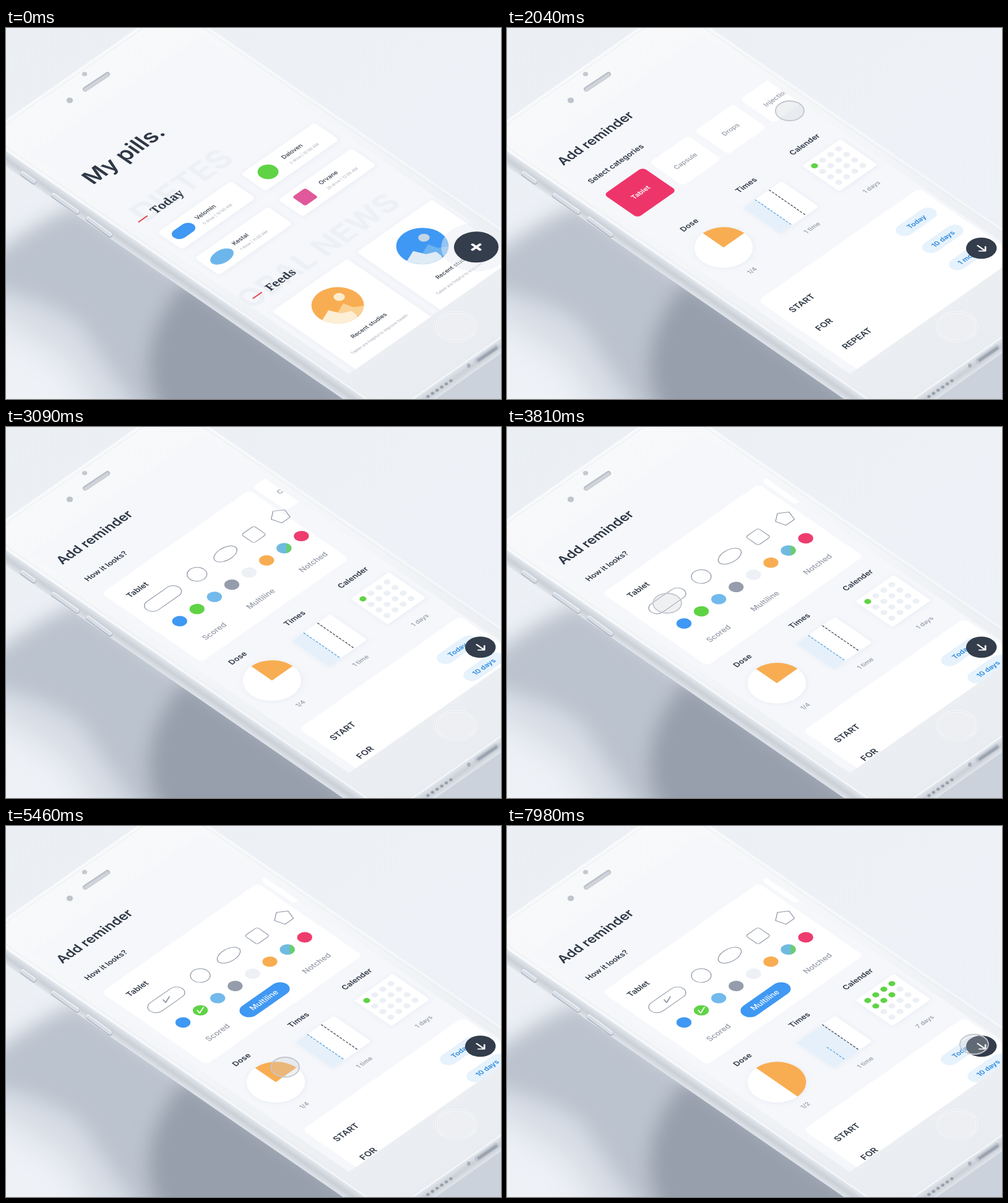
These frames come from a looping animation (800x600 px, 8000 ms). An HTML page:

```html
<!DOCTYPE html>
<html lang="en">
<head>
<meta charset="utf-8">
<title>Pill reminder</title>
<style>
html, body { margin: 0; width: 100%; height: 100%; overflow: hidden; background: #edf1f6; }
svg { display: block; width: 100vw; height: 100vh; }
text { font-family: Inter, sans-serif; font-weight: 600; fill: #2f3846; }
.mid { text-anchor: middle; }
.name { font-weight: 500; }
.soft { font-weight: 500; fill: #9298a5; }
.tiny { font-weight: 400; fill: #a4a9b4; }
.serif { font-family: "Noto Serif", serif; font-weight: 700; }
.ghost { font-weight: 700; fill: #edf0f5; }
.blue { fill: #2b88de; }
.line { fill: none; stroke: #8b93a3; stroke-width: .9; }
.round { fill: none; stroke-linecap: round; stroke-linejoin: round; }
.cards { filter: drop-shadow(0 1px 3px #d5dce780); }
</style>
</head>
<body>
<svg id="stage" viewBox="0 0 800 600" preserveAspectRatio="none"></svg>
<script>
const LOOP = 8000;
const PLANE = 'matrix(1 -.7 1 .69 40 205)';
const DARK = '#333d4b', GREEN = '#5fd345', BLUE = '#3f98f3', ORANGE = '#f8ad52', PINK = '#ee356a';

// ---- shape helpers (plane coordinates: u along the text, v down the screen) ----
const rect = (u, v, w, h, r, fill, more = '') =>
  `<rect x="${u}" y="${v}" width="${w}" height="${h}" rx="${r}" fill="${fill}" ${more}/>`;
const dot = (u, v, r, fill, more = '') => `<circle cx="${u}" cy="${v}" r="${r}" fill="${fill}" ${more}/>`;
const pill = (u, v, w, h, fill, more = '') => rect(u - w / 2, v - h / 2, w, h, h / 2, fill, more);
const text = (u, v, size, str, cls = '', more = '') =>
  `<text x="${u}" y="${v}" font-size="${size}" class="${cls}" ${more}>${str}</text>`;
const group = (id, body, more = '') => `<g id="${id}" ${more}>${body}</g>`;
const bar = (x1, y1, x2, y2, w, color) =>
  `<path class="round" d="M${x1} ${y1}L${x2} ${y2}" stroke="${color}" stroke-width="${w}"/>`;
// stage offset -> plane offset
const toPlane = ([x, y]) => {
  const v = (y + .7 * x) / 1.39;
  return [x - v, v];
};
const poly = (u, v, pts, fill, more = '') =>
  `<polyline points="${pts.map(p => { const [a, b] = toPlane(p); return [u + a, v + b]; }).join(' ')}" fill="${fill}" ${more}/>`;

// ---- phone ----
function phone() {
  let side = '';
  for (let d = 26; d > 0; d -= 2) {
    const shade = 207 + Math.round(28 * Math.abs(d - 15) / 15);
    side += `<g transform="translate(0 ${d})">${rect(-15, -60, 305, 655, 42,
      `rgb(${shade - 5},${shade},${shade + 7})`, `transform="${PLANE}"`)}</g>`;
  }
  const key = (x1, y1, x2, y2) =>
    bar(x1, y1, x2, y2, 8, '#a8b1bd') + bar(x1, y1 - 1, x2, y2 - 1, 6.5, '#eef1f5') + bar(x1, y1, x2, y2, 4.5, '#d7dde5');
  let holes = '';
  for (let i = 0; i < 6; i++) holes += `<ellipse cx="${682 + i * 7.4}" cy="${596 - i * 5.1}" rx="2.7" ry="2.4" fill="#979faa"/>`;
  return '<path d="M560 600L800 510V600Z" fill="#cbd2db"/>' + side
    + `<g transform="${PLANE}">`
    + rect(-15, -60, 305, 655, 42, 'url(#face)', 'stroke="#fafbfc" stroke-width="1.4"')
    + rect(-11, -56, 297, 647, 38, 'none', 'stroke="#e8ecf0" stroke-width=".8"')
    + '</g>'
    + key(27, 236, 45, 249) + key(77, 271, 115, 298) + key(133, 309, 168, 335)
    + bar(128, 99, 164, 75, 8, '#b9bec6') + bar(128, 100, 164, 76, 5, '#d0d4da')
    + '<ellipse cx="127" cy="74.500" rx="4.200" ry="3.600" fill="#c4c9d0"/>'
    + '<ellipse cx="103" cy="117" rx="5.200" ry="4.500" fill="#bfc4cc"/>'
    + '<ellipse cx="727.500" cy="483" rx="32" ry="23.500" fill="#edeff3" stroke="#fff" stroke-width="3"/>'
    + '<ellipse cx="727.500" cy="483" rx="32" ry="23.500" fill="none" stroke="#d2d7dd" stroke-width="1"/>'
    + holes
    + '<ellipse cx="748" cy="546" rx="3" ry="3.500" fill="#aab1bb"/>'
    + bar(762, 538, 792, 517, 10, '#c1c8d1') + bar(764, 537, 792, 518, 5, '#9ca4af');
}

// ---- first screen ----
function home() {
  const meds = [
    ['Velomin', '5 drive | 10:00 AM', pill(34, 213, 31, 17, BLUE)],
    ['Daloven', '2 drive | 10:00 AM', dot(170.5, 213, 12, GREEN)],
    ['Kestal', '1 dose | 11:00 AM', '<ellipse cx="35" cy="274" rx="16" ry="10" fill="#6db6ec"/>'],
    ['Orvane', '25 drive | 12:00 AM', rect(160.5, 262, 21, 21, 3, '#e0599b')]
  ];
  let cards = '', info = '';
  meds.forEach(([name, when, icon], i) => {
    const col = i % 2, u = 11 + col * 135, v = 193.5 + (i >> 1) * 60, tu = u + 47 + col * 5;
    cards += rect(u, v, 119, 40, 4, '#fff');
    info += icon + text(tu, v + 18, 8, name, 'name') + text(tu, v + 29.5, 5.3, when, 'tiny');
  });
  const feed = (u, tones, id) => {
    const cu = u + 60, cv = 425;
    cards += rect(u, 378.5, 122, 150, 4, '#fff');
    info += `<clipPath id="${id}">${dot(cu, cv, 30, '#000')}</clipPath>` + dot(cu, cv, 30, tones[0])
      + `<g clip-path="url(#${id})">`
      + poly(cu, cv, [[0, 12], [9, -3], [25, 3], [46, 0], [46, 16], [14, 18]], tones[1])
      + poly(cu, cv, [[-25, 24], [-15, 8], [6, 13], [22, 9], [30, 15], [36, 26], [10, 40]], tones[2])
      + '</g>' + dot(cu + 11, cv - 8.5, 6.5, tones[3])
      + text(u + 61.5, 476.5, 7.8, 'Recent studies', 'mid name')
      + text(u + 60, 494.5, 5.4, 'Tablet are helpful to improve health', 'tiny mid');
  };
  feed(11, [ORANGE, '#fbd193', '#fdeed6', '#fdeccb'], 'photoA');
  feed(148, [BLUE, '#6cb2f1', '#dfebf5', '#c6d5e4'], 'photoB');
  return group('ghosts', text(12, 173, 41.5, 'DIETES', 'ghost') + text(-56, 360, 40.5, 'GLOBAL NEWS', 'ghost'))
    + text(14.5, 86, 29.5, 'My pills.')
    + bar(8.5, 166, 22, 166, 1.7, '#e8484f') + text(31, 171, 15.5, 'Today', 'serif')
    + bar(11.5, 348, 25, 348, 1.7, '#e8484f') + text(33.5, 354, 15, 'Feeds', 'serif')
    + `<g class="cards">${cards}</g>` + info;
}

// ---- reminder form ----
const CHECK = [[-5, 0], [-1, 4.5], [5, -5]];
const check = (id, u, v, color) =>
  group(id, poly(u, v, CHECK, 'none', `class="round" stroke="${color}" stroke-width="1.4"`));

function options() {
  const star = [0, 1, 2, 3, 4].map(i => {
    const a = i * Math.PI * .4 - Math.PI / 2;
    return [244 + 11.5 * Math.cos(a), 164.5 + 11.5 * Math.sin(a)];
  });
  const tints = [BLUE, GREEN, '#72b9ec', '#959dac', '#edf0f5', ORANGE, '#6fbbe0', '#ee3c6e'];
  return pill(54, 165, 52, 19, 'none', 'class="line"')
    + dot(109.5, 164.5, 11.3, 'none', 'class="line"')
    + '<ellipse cx="156" cy="164" rx="16" ry="9.500" class="line"/>'
    + rect(191.3, 154.5, 20, 20, 3, 'none', 'class="line"')
    + `<polygon points="${star.join(' ')}" class="line"/>`
    + tints.map((c, i) => dot(41 + i * 28.1, 205, 8.6, c)).join('')
    + '<path d="M217.300 201.300A8.600 8.600 0 0 1 206 212.800Z" fill="#69cf6a"/>'
    + check('checkA', 54, 165, '#8b93a3') + check('checkB', 69.1, 205, '#fff')
    + group('pick', pill(0, 0, 72, 22, BLUE))
    + text(57, 248.5, 10.3, 'Scored', 'soft mid')
    + text(132, 248.5, 10.3, 'Multiline', 'soft mid', 'id="multi"')
    + text(217, 248.5, 10.3, 'Notched', 'soft mid');
}

function form() {
  const cards = ['Capsule', 'Drops', 'Injection'].map((name, i) =>
    rect(85.2 + i * 73, 105, 62, 54.3, 5, '#fff')
    + text(116 + i * 73, 135.5, 8.8, name, 'soft mid label')).join('');
  let days = '';
  for (let i = 0; i < 16; i++) days += dot(214 + i % 4 * 13, 243 + (i >> 2) * 13, 4, '#eceff5', 'class="day"');
  const dash = (id, u, color) =>
    `<path id="${id}" d="M${u} 234V294" stroke="${color}" stroke-width="1" stroke-dasharray="3.200 1.800"/>`;
  const parts = text(32, 213.5, 10.2, 'Dose') + text(121.5, 213.5, 10.2, 'Times') + text(208.5, 213.5, 10.2, 'Calender')
    + '<g class="cards">' + dot(46, 264, 33.5, '#fff') + rect(108, 234, 62, 60, 3, '#fff') + rect(204, 233, 62, 60, 3, '#fff') + '</g>'
    + `<path id="slice" fill="${ORANGE}"/>`
    + rect(108, 234, 19, 60, 2, '#e5f0fa', 'id="span"') + dash('dashA', 127, '#4a9be0') + dash('dashB', 149.5, '#2f3846') + days
    + text(42, 317, 8.3, '', 'soft mid', 'id="dose"') + text(140, 316, 8.3, '1 time', 'soft mid')
    + text(235, 317, 8.3, '', 'soft mid', 'id="count"');
  const rows = ['START', 'FOR', 'REPEAT'].map((s, i) => text(25.5, 396.5 + i * 43, 11.4, s)).join('');
  const tags = ['Today', '10 days', '1 month'].map((s, i) =>
    pill(230.5 + i * 1.5, 391 + i * 41.5, 58, 20, '#e6f2fc')
    + text(230.5 + i * 1.5, 394.5 + i * 41.5, 9.2, s, 'blue mid')).join('');
  return text(14, 82.5, 10.2, 'Select categories', '', 'id="headA"')
    + text(13.5, 79, 10.1, 'How it looks?', '', 'id="headB"')
    + group('cats', cards) + group('parts', parts)
    + group('plan', rect(11.5, 354, 260, 330, 7, '#fff') + rows + tags)
    + rect(0, 0, 0, 0, 5.5, PINK, 'id="panel"') + group('options', options())
    + text(43.5, 0, 9, 'Tablet', 'mid', 'id="tab"');
}

document.getElementById('stage').innerHTML = `
<defs>
  <linearGradient id="bg" x2="1" y2="1"><stop stop-color="#ebeff4"/><stop offset=".5" stop-color="#eef1f6"/><stop offset="1" stop-color="#edf2f8"/></linearGradient>
  <linearGradient id="face" x2="0" y2="1"><stop stop-color="#f8f9fa"/><stop offset=".5" stop-color="#f3f5f8"/><stop offset="1" stop-color="#e9ecf0"/></linearGradient>
  <filter id="blurS" x="-30%" y="-30%" width="160%" height="160%"><feGaussianBlur stdDeviation="15"/></filter>
  <filter id="blurL" x="-30%" y="-30%" width="160%" height="160%"><feGaussianBlur stdDeviation="26"/></filter>
  <clipPath id="screen">${rect(0, 0, 275.5, 514, 0, '#000')}</clipPath>
</defs>
<rect width="800" height="600" fill="url(#bg)"/>
<path d="M-60 400L110 300L640 660H170L100 540L-40 450Z" fill="#d5dbe4" filter="url(#blurL)"/>
<path d="M-25 375Q40 320 115 288L640 650H235L120 478Q60 435 -25 420Z" fill="#bbc3ce" filter="url(#blurS)"/>
<path d="M290 410L640 650H270Q225 590 232 530T290 410Z" fill="#979fac" filter="url(#blurS)"/>
${phone()}
<g transform="${PLANE}"><g clip-path="url(#screen)">
  ${rect(0, 0, 276, 514, 0, '#f5f7fb')}
  ${group('home', home())}
  ${text(12.5, 38.8, 17.6, 'Add reminder', '', 'id="title"')}
  ${group('form', form())}
  ${dot(250, 470, 40, '#e9edf3', 'id="halo"')}
  ${group('add', dot(0, 0, 25.5, DARK) + bar(-6, 0, 6, 0, 3.4, '#fff') + bar(0, -6, 0, 6, 3.4, '#fff'))}
  ${group('next', dot(0, 0, 17.5, DARK) + '<path class="round" stroke="#fff" stroke-width="1.900" d="M0-6V6.500M-5 1.500L0 6.500L5 1.500"/>')}
</g></g>
<ellipse id="touch" rx="23" ry="16" fill="#c9cdd5" fill-opacity=".3" stroke="#c3c7ce" stroke-width="1.800"/>`;

// ---- motion ----
const $ = id => document.getElementById(id);
const labels = document.querySelectorAll('.label'), dayDots = document.querySelectorAll('.day');
const set = (id, attrs) => { for (const k in attrs) $(id).setAttribute(k, attrs[k]); };
const seg = (t, a, b) => Math.max(0, Math.min(1, (t - a) / (b - a)));
const mix = (a, b, k) => a + (b - a) * k;
const quad = x => x < .5 ? 2 * x * x : 1 - 2 * (1 - x) ** 2;
const cubic = x => x < .5 ? 4 * x ** 3 : 1 - 4 * (1 - x) ** 3;
const blend = (a, b, k) => `rgb(${a.map((c, i) => Math.round(mix(c, b[i], k)))})`;
const shift = (id, u, v) => set(id, { transform: `translate(${u} ${v})` });
const fade = (id, k) => set(id, { opacity: k });

// time, x, y, opacity of the finger
const PATH = [
  [1820, 480, 118, 0], [1980, 457, 134, 1], [2070, 457, 134, 1], [2430, 216, 266, 1], [2520, 216, 266, 1],
  [2700, 216, 266, 0], [3500, 259, 285, 0], [3780, 259, 285, 1], [4020, 259, 285, 1], [4290, 314, 298, 1],
  [4440, 314, 298, 1], [4740, 418, 281, 1], [4950, 418, 281, 1], [5400, 451, 390, 1], [5500, 451, 390, 1],
  [5950, 470, 438, 1], [6250, 518, 358, 1], [6650, 541, 341, 1], [6950, 584, 282, 1], [7250, 624, 254, 1],
  [7340, 597, 291, 1], [7560, 624, 272, 1], [7900, 755, 353, 1], [8000, 755, 353, 1]
];
function finger(t) {
  const i = PATH.findIndex(p => p[0] > t);
  if (i < 1) return [0, 0, 0];
  const a = PATH[i - 1], b = PATH[i], k = quad(seg(t, a[0], b[0]));
  return [1, 2, 3].map(n => mix(a[n], b[n], k));
}

function draw(t) {
  // first screen leaves
  const out = quad(seg(t, 840, 1200));
  fade('home', 1 - out);
  shift('home', 0, -24 * out);
  shift('ghosts', -12 * seg(t, 0, 1100), 0);
  const pulse = seg(t, 0, 650);
  set('halo', { r: 40 + 8 * pulse, opacity: .5 * (1 - pulse) });
  set('add', { transform: `translate(250 470) scale(${1 - cubic(seg(t, 900, 1300))})` });
  set('next', { transform: `translate(252 474.7) scale(${quad(seg(t, 1375, 1650))})` });

  // form arrives
  fade('title', seg(t, 1130, 1380));
  shift('form', 0, 440 * (1 - quad(seg(t, 1350, 1950))));
  const shown = seg(t, 1600, 1880);
  labels.forEach(l => l.setAttribute('opacity', shown));

  // card opens into the option panel
  const p = cubic(seg(t, 2500, 3300)), tone = seg(p, .05, .4);
  fade('headA', 1 - seg(p, 0, .4));
  fade('headB', seg(p, .4, .85));
  shift('cats', 183 * p, -2 * p);
  shift('parts', 0, 86 * p);
  shift('plan', 0, 73 * p);
  set('panel', {
    x: mix(11.5, 10.5, p), y: mix(104.8, 103.5, p), width: mix(63, 252.5, p), height: mix(54.7, 169.5, p),
    fill: blend([238, 53, 106], [255, 255, 255], tone)
  });
  $('tab').style.fill = blend([255, 255, 255], [47, 56, 70], tone);
  set('tab', { y: mix(135.5, 132.2, p), 'font-size': mix(9, 10.5, p), opacity: shown });
  fade('options', seg(p, .5, .9));
  shift('options', 0, -75 * (1 - p));

  // choices
  fade('checkA', seg(t, 3900, 4050));
  fade('checkB', seg(t, 4330, 4470));
  const pick = quad(seg(t, 4790, 4970));
  set('pick', { transform: `translate(133 245) scale(${mix(.7, 1, pick)})`, opacity: pick });
  $('multi').style.fill = blend([146, 152, 165], [255, 255, 255], pick);

  const turn = quad(seg(t, 5500, 5950)), a = Math.PI / 2 * (1 + turn);
  set('slice', { d: `M46 264V230.5A33.5 33.5 0 0 1 ${46 + 33.5 * Math.sin(a)} ${264 - 33.5 * Math.cos(a)}Z` });
  $('dose').textContent = turn < .6 ? '1/4' : '1/2';

  const drag = quad(seg(t, 6250, 6650));
  set('span', { width: mix(19, 41.5, drag) });
  set('dashA', { d: `M127 ${mix(234, 264, drag)}V294` });

  const n = 1 + Math.floor(3 * seg(t, 6950, 7250) + 3 * seg(t, 7310, 7560));
  dayDots.forEach((d, i) => d.setAttribute('fill', i < n ? GREEN : '#eceff5'));
  $('count').textContent = n + ' days';

  const [x, y, o] = finger(t);
  set('touch', { cx: x, cy: y, opacity: o });
}

const start = performance.now();
function tick() {
  draw((performance.now() - start) % LOOP);
  requestAnimationFrame(tick);
}
tick();
</script>
</body>
</html>
```
